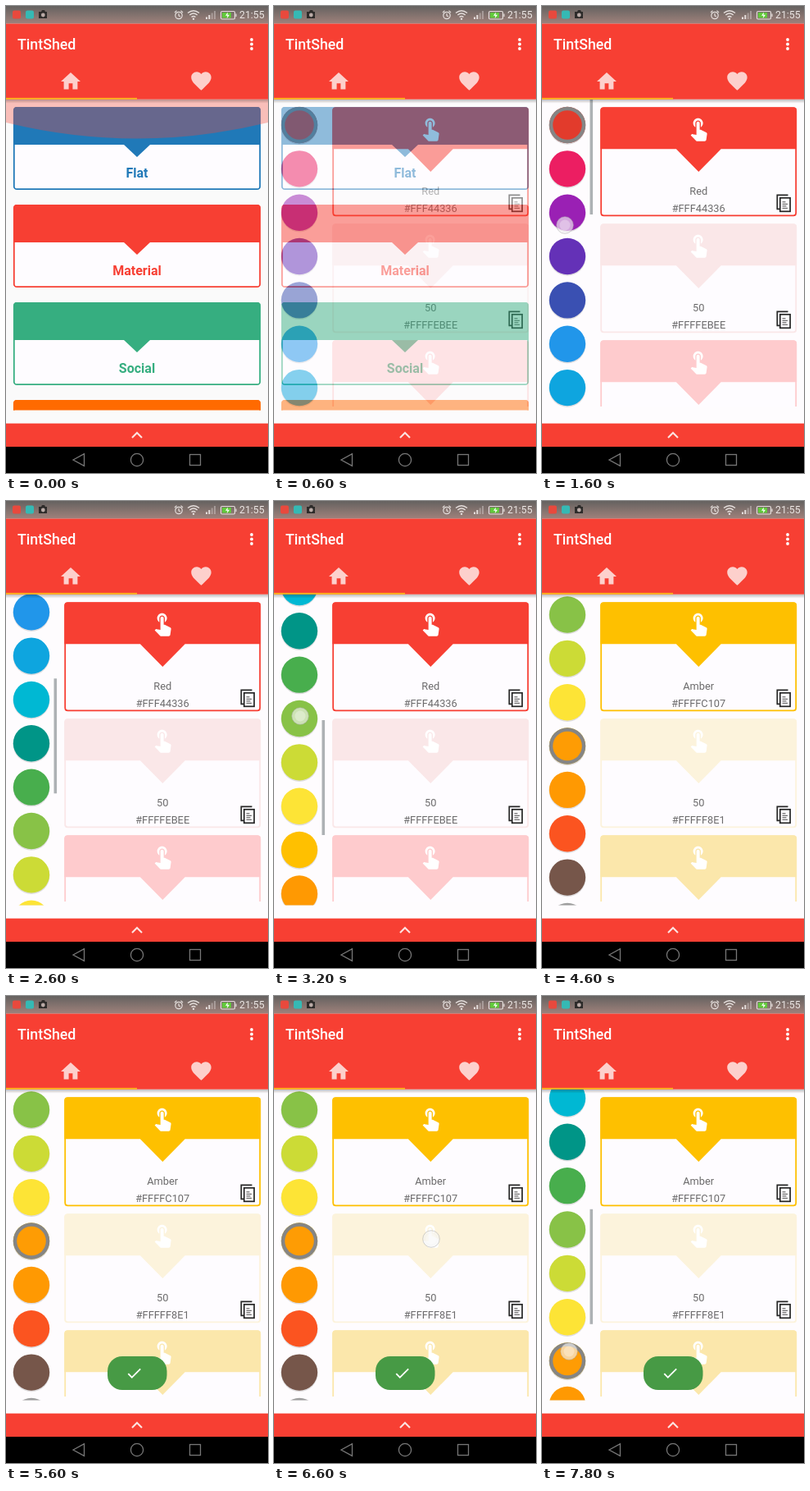
Write an HTML page that moves like this. It is 320 px wide and 569 px high and loops after 8 s.

```html
<!DOCTYPE html>
<html lang="en">
<head>
<meta charset="utf-8">
<title>TintShed</title>
<style>
  html, body { margin: 0; width: 100%; height: 100%; overflow: hidden; background: #fafafa; }
  svg { display: block; width: 100vw; height: 100vh; }
  text { font-family: Roboto, "Noto Sans", sans-serif; }
  .mid { text-anchor: middle; }
  .line { fill: none; }
</style>
</head>
<body>
<svg viewBox="0 0 320 569">
  <defs>
    <linearGradient id="shade" x2="0" y2="1">
      <stop offset="0" stop-color="#000" stop-opacity=".26"/>
      <stop offset="1" stop-color="#000" stop-opacity="0"/>
    </linearGradient>
    <linearGradient id="status" x2="0" y2="1">
      <stop offset="0" stop-color="#656260"/>
      <stop offset="1" stop-color="#9f817b"/>
    </linearGradient>
    <clipPath id="listClip"><rect y="113" width="320" height="379.400"/></clipPath>
    <clipPath id="cardClip"><rect y="113" width="320" height="375"/></clipPath>
    <path id="tap" d="M9 11.24V7.5C9 6.12 10.12 5 11.5 5S14 6.12 14 7.5v3.74c1.21-.81 2-2.18 2-3.74C16 5.01 13.99 3 11.5 3S7 5.01 7 7.5c0 1.56.79 2.93 2 3.74zm9.84 4.63l-4.54-2.26c-.17-.07-.35-.11-.54-.11H13v-6c0-.83-.67-1.5-1.5-1.5S10 6.67 10 7.5v10.74l-3.43-.72c-.08-.01-.15-.03-.24-.03-.31 0-.59.13-.79.33l-.79.8 4.94 4.94c.27.27.65.44 1.06.44h6.79c.75 0 1.33-.55 1.44-1.28l.75-5.27c.01-.07.02-.14.02-.2 0-.62-.38-1.16-.91-1.38z"/>
    <g id="copy" class="line" stroke="#262626" stroke-width="1.7">
      <path d="M287.300 124V107H300.500M290.500 124h-4"/>
      <rect x="290.800" y="110.500" width="12.300" height="16.500" fill="#fefcfe"/>
      <path stroke-width="1" stroke="#4a4a4a" d="M293.500 115.500h4M293.500 118h6.500M293.500 120.500h5M293.500 123h6.500"/>
    </g>
  </defs>

  <g id="home">
    <rect y="113" width="320" height="396" fill="#fafafa"/>
    <g id="groups" clip-path="url(#listClip)"></g>
    <path id="glow" fill="#f44336" d="M0 113.700H320V142Q160 181 0 142Z"/>
  </g>

  <g id="detail">
    <rect y="113" width="320" height="396" fill="#fefcfe"/>
    <g clip-path="url(#cardClip)">
      <g id="red"></g>
      <g id="amber"></g>
    </g>
    <g clip-path="url(#listClip)">
      <g id="dots"></g>
      <rect id="bar" x="58.500" y="114" width="3.600" height="140" fill="#adb1b4"/>
    </g>
  </g>

  <rect y="113.700" width="320" height="5" fill="url(#shade)"/>
  <rect y="21.300" width="320" height="92.400" fill="#f73f33"/>
  <text x="14" y="53" font-size="17.800" font-weight="500" fill="#fff">TintShed</text>
  <g fill="#fff">
    <circle cx="300" cy="41" r="1.900"/><circle cx="300" cy="46.500" r="1.900"/><circle cx="300" cy="52" r="1.900"/>
  </g>
  <g fill="#fdd0cc">
    <path transform="translate(64.600 77.500) scale(1.200)" d="M10 20v-6h4v6h5v-8h3L12 3 2 12h3v8z"/>
    <path transform="translate(223.800 76.700) scale(1.220)" d="M12 21.350l-1.450-1.320C5.400 15.360 2 12.280 2 8.500 2 5.420 4.420 3 7.500 3c1.740 0 3.410.81 4.500 2.090C13.090 3.810 14.760 3 16.500 3 19.580 3 22 5.420 22 8.500c0 3.780-3.400 6.860-8.550 11.540z"/>
  </g>
  <rect y="111.900" width="160" height="1.800" fill="#ffb81c"/>

  <rect width="320" height="21.300" fill="url(#status)"/>
  <rect x="8" y="5.500" width="10" height="10" rx="2" fill="#e8493d"/>
  <rect x="24" y="5.500" width="10" height="10" rx="2" fill="#35b9b4"/>
  <path d="M40 7h3l1-2h3l1 2h2v8H40z" fill="#2d2b2a"/>
  <circle cx="45.300" cy="11" r="2.400" fill="#b9aaa6"/>
  <g class="line" stroke="#e4dddb" stroke-width="1.200">
    <circle cx="211" cy="11.500" r="4.200"/>
    <path d="M211 9v2.800l2 1M206 8l2.500-2.400M216 8l-2.500-2.400"/>
    <path d="M222 8.500Q229 2.800 236 8.500M224.300 11Q229 7.200 233.700 11M226.500 13.500Q229 11.500 231.500 13.500" stroke-width="1.500"/>
    <path d="M245 16v-2.500M248.300 16v-5" stroke-width="2"/>
    <path d="M251.700 16V8.500M255 16V6" stroke-width="2" opacity=".4"/>
    <rect x="262.500" y="6.500" width="17" height="9.500" rx="1.500"/>
    <path d="M281 9.500v3.500"/>
  </g>
  <circle cx="229" cy="15.700" r="1.200" fill="#e4dddb"/>
  <rect x="264" y="8" width="11" height="6.500" fill="#62c93c"/>
  <path d="M271 7.500l-3 4.300h2.500l-.8 3.400 3.300-4.500h-2.500z" fill="#fff"/>
  <text x="285" y="15.300" font-size="12.300" fill="#ebe5e3">21:55</text>

  <rect y="508.600" width="320" height="29" fill="#f73f33"/>
  <path class="line" d="M154 526l6-6 6 6" stroke="#fde3e1" stroke-width="2.100"/>
  <rect y="537" width="320" height="32" fill="#000"/>
  <g class="line" stroke="#777" stroke-width="1.300">
    <path d="M82 553l13.500-7.300v14.600z"/>
    <circle cx="160" cy="553" r="7.600"/>
    <rect x="224.500" y="546.500" width="13" height="13"/>
  </g>

  <g id="toast">
    <rect x="124" y="439" width="72.500" height="41" rx="18" fill="#479a45"/>
    <path transform="translate(145.500 448.500) scale(.92)" fill="#fff" d="M9 16.170L4.830 12l-1.420 1.410L9 19 21 7l-1.410-1.410z"/>
  </g>
  <g id="touch">
    <circle r="10.300" fill="#f4f4f4" fill-opacity=".64" stroke="#aaa" stroke-opacity=".5"/>
    <circle r="6.500" fill="#fff" fill-opacity=".3"/>
  </g>
</svg>
<script>
const $ = id => document.getElementById(id);
const LOOP = 8000, STEP = 200, GAP = 53.35;

const groupCard = ([name, color], i) => `
  <g transform="translate(0 ${123 + i * 119})">
    <rect x="9.800" y="1" width="300.400" height="99.200" rx="3.500" fill="#fefcff" stroke="${color}" stroke-width="1.800"/>
    <path d="M9 46V4q0-4 4-4H307q4 0 4 4V46H176L160 61 144 46Z" fill="${color}"/>
    <text class="mid" x="160" y="85.500" font-size="16" font-weight="700" fill="${color}">${name}</text>
  </g>`;

const shadeCard = ([name, hex, color], i) => `
  <g transform="translate(0 ${123.3 + i * 142})">
    <rect x="72.200" y="1" width="238" height="131" rx="3" fill="#fefcff" stroke="${color}" stroke-width="1.800"/>
    <path d="M71.300 51V4q0-4 4-4H307.100q4 0 4 4V51H218.700L191.300 78.600 163.900 51Z" fill="${color}"/>
    <use href="#tap" fill="#fff" transform="translate(175.300 9.500) scale(1.333)"/>
    <g class="mid" font-size="12.800" fill="#6c6b6c">
      <text x="191.200" y="106.500">${name}</text>
      <text x="191.200" y="127.800">${hex}</text>
    </g>
    <use href="#copy"/>
  </g>`;

const dot = (color, i) => `
  <g transform="translate(31 ${145 + i * GAP})">
    <circle cy="1.300" r="22.400" opacity=".12"/>
    <circle r="22.200" fill="${color}"/>
    <g class="ring"><circle r="22.200" fill="#858585"/><circle r="17.800" fill="${i ? '#fe9c04' : '#e23b2c'}"/></g>
  </g>`;

const groups = [['Flat', '#2079b8'], ['Material', '#f73f33'], ['Social', '#36ae80'], ['', '#ff6a00']];
const reds = [['Red', '#FFF44336', '#f73f33'], ['50', '#FFFFEBEE', '#fae7e8'], ['100', '#FFFFCDD2', '#fecbcd']];
const ambers = [['Amber', '#FFFFC107', '#fec000'], ['50', '#FFFFF8E1', '#fcf3dc'], ['100', '#FFFFECB3', '#fbe7ab']];
const palette = ('#f73f33 #ec1e62 #9a20b4 #6431b7 #3a50b2 #2196ea #0ea5df #00b8d3 #009587 #48ae4d ' +
  '#88c247 #ccdb36 #fde436 #ffc000 #ff9902 #fb5420 #76564a #9e9e9e #607d8b').split(' ');

$('groups').innerHTML = groups.map(groupCard).join('');
$('red').innerHTML = reds.map(shadeCard).join('');
$('amber').innerHTML = ambers.map(shadeCard).join('');
$('dots').innerHTML = palette.map(dot).join('');
const rings = document.querySelectorAll('.ring');

// start time, list scroll, finger x and y (when down)
const moves = [
  [0, 0], [400, 0, 160, 290], [600, 0],
  [1600, 0, 28, 267], [1800, 105, 29, 162], [2000, 196], [2200, 247], [2400, 269], [2600, 276.5],
  [2800, 276.5, 31, 399], [3000, 340, 32, 336], [3200, 413.5, 32, 262], [3400, 500], [3600, 540],
  [4000, 540, 31, 299], [4400, 540],
  [5200, 540, 192, 152], [5400, 540],
  [6600, 540, 192, 296], [6800, 540],
  [7400, 540, 31, 287], [7600, 465, 32, 362], [7800, 394, 33, 433]
];

const fade = (id, v) => {
  $(id).style.opacity = v;
  $(id).style.display = v ? '' : 'none';
};
const within = (t, a, b) => t >= a && t < b;

function draw(t) {
  const [, scroll, x, y] = moves.filter(m => m[0] <= t).pop();
  const amber = t >= 4400;

  fade('home', t < 800 ? 1 : 0);
  fade('glow', t < 200 ? .33 : t < 400 ? .14 : 0);
  fade('detail', t < 600 ? 0 : t < 800 ? .5 : 1);
  fade('red', amber ? 0 : 1);
  fade('amber', amber ? 1 : 0);
  fade('toast', t < 5400 ? 0 : t < 5600 ? .55 : 1);
  fade('bar', within(t, 800, 1000) ? .5 : within(t, 1600, 3800) || t >= 7400 ? 1 : 0);
  fade('touch', x ? 1 : 0);

  $('dots').setAttribute('transform', `translate(0 ${-scroll})`);
  $('bar').setAttribute('y', 114 + scroll * .37);
  if (x) $('touch').setAttribute('transform', `translate(${x} ${y})`);
  rings.forEach((ring, i) => ring.style.display = i === (amber ? 13 : 0) ? '' : 'none');
}

const start = performance.now();
function tick() {
  const t = (performance.now() - start) % LOOP;
  draw(Math.floor(t / STEP) * STEP);
  requestAnimationFrame(tick);
}
tick();
</script>
</body>
</html>
```
